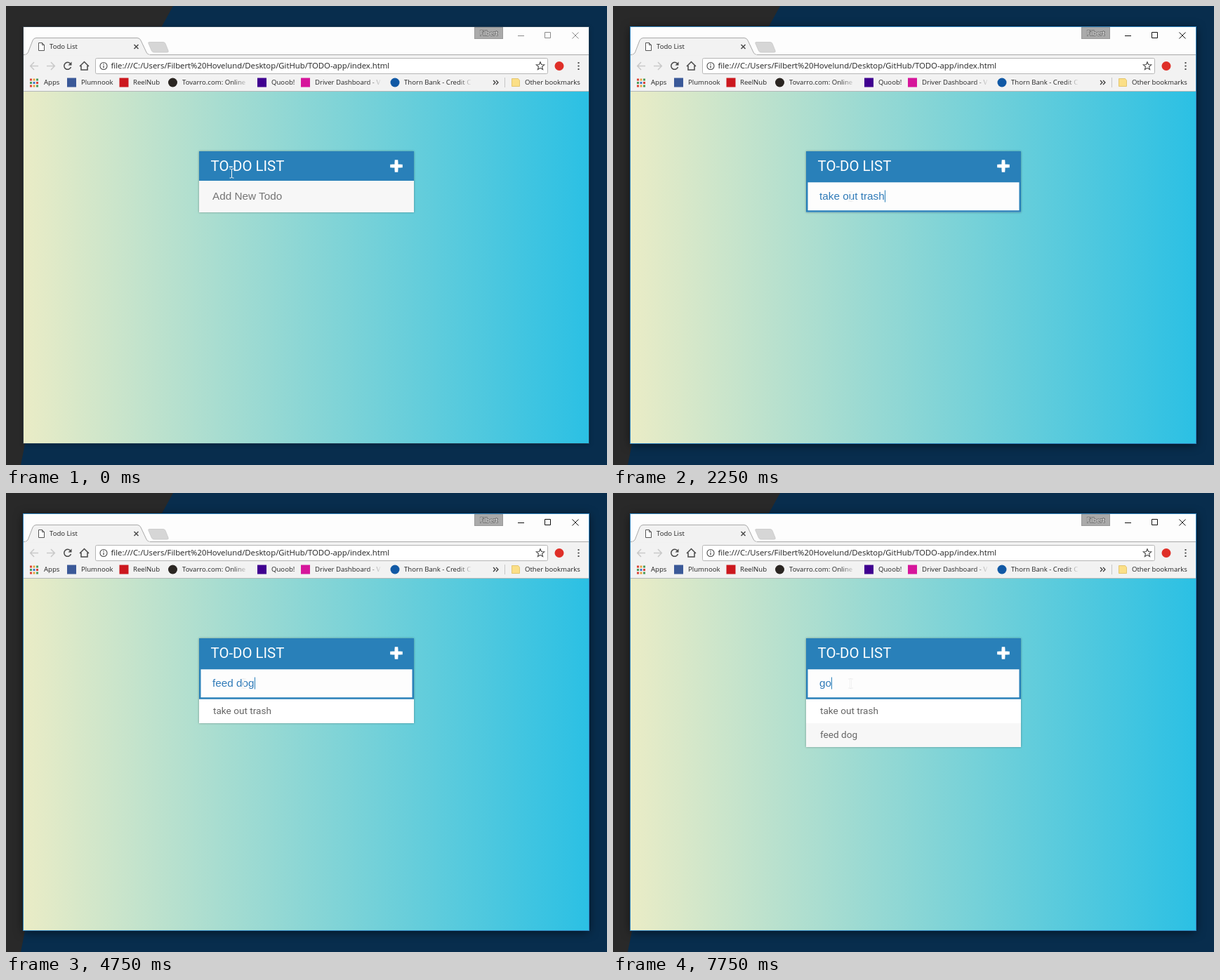
Write an HTML page that moves like this. It is 856 by 654 pixels and loops after 8000 ms.

```html
<!DOCTYPE html>
<html lang="en">
<head>
<meta charset="utf-8">
<title>Todo List</title>
<style>
  html, body { margin: 0; height: 100%; overflow: hidden; background: #082d4d; }
  svg { display: block; }
  text { white-space: pre; }
  .ui { font: 9.6px "Open Sans", "Noto Sans", sans-serif; fill: #222; }
  .input { font: 15.3px "Liberation Sans", Arial, sans-serif; }
  .item { font: 13.6px Roboto, sans-serif; fill: #666; }
  .line { fill: none; stroke: #4a4a4a; stroke-width: 1.5; }
  #win { filter: drop-shadow(0 1px 3px rgba(0,0,0,.35)); }
  .active #win { filter: drop-shadow(0 2px 7px rgba(0,0,0,.6)); }
  #edge { fill: none; stroke: #4d6478; opacity: .4; }
  .active #edge { stroke: #2f82bd; opacity: 1; }
  #controls { fill: none; stroke: #8a8a8a; }
  .active #controls { stroke: #111; }
  #card { filter: drop-shadow(0 0 1.5px rgba(0,0,0,.35)); }
</style>
</head>
<body>
<svg id="stage" width="856" height="654" viewBox="0 0 856 654">
  <defs>
    <linearGradient id="page"><stop stop-color="#eaecc6"/><stop offset="1" stop-color="#2bc0e4"/></linearGradient>
    <linearGradient id="fade"><stop stop-color="#f2f2f2" stop-opacity="0"/><stop offset="1" stop-color="#f2f2f2"/></linearGradient>
  </defs>

  <rect width="856" height="654" fill="#082d4d"/>
  <path d="M0 0H238L222 29V200L27 624L21 654H0Z" fill="#292929"/>

  <rect id="win" x="25" y="30" width="805" height="593" fill="#fdfdfd"/>
  <rect x="25" y="69" width="805" height="53" fill="#f2f2f2"/>
  <rect x="25" y="122" width="805" height="501" fill="url(#page)"/>
  <path d="M25 121.5H830" stroke="#b4b8b8"/>
  <path d="M25 69.5H27Q30 69 31.500 66L38 49Q39.500 45.500 43 45.500H187Q190.500 45.500 192 49L200 66Q201.500 69.500 205 69.500H830" fill="#f2f2f2" stroke="#a9a9a9"/>
  <path d="M27 70H205" stroke="#f2f2f2"/>
  <path d="M204 51.500H224Q226 51.500 227 53.500L231 63.500Q232 66 229.500 66H211Q208.500 66 207.500 64L203 53.500Q202 51.500 204 51.500Z" fill="#d6d6d6" stroke="#c3c3c3" stroke-width=".7"/>
  <rect id="edge" x="24.5" y="29.5" width="806" height="594"/>

  <!-- tab and window buttons -->
  <path d="M46.500 52.500H51.500L54.500 55.500V63.500H46.500ZM51.500 52.500V55.500H54.500" fill="#fff" stroke="#555"/>
  <text class="ui" x="62" y="61.300">Todo List</text>
  <path class="line" d="M182.500 55L188.500 61M188.500 55L182.500 61"/>
  <rect x="667.5" y="30.500" width="40" height="16" fill="#aaa" stroke="#999"/>
  <text class="ui" x="687.5" y="41.600" text-anchor="middle" style="font-size:8.6px;fill:#fff;stroke:#666;stroke-width:1.4px;paint-order:stroke">Filbert</text>
  <path id="controls" d="M729 42.500H738M767.500 37.500H775.500V45.500H767.500ZM806.500 37.500L815.500 46.500M815.500 37.500L806.500 46.500"/>

  <!-- toolbar -->
  <g class="line">
    <path d="M46 85.500H35M40 80L34.700 85.500L40 91M58 85.500H69M64 80L69.300 85.500L64 91" stroke="#c9c9c9"/>
    <path d="M91.500 82A5 5 0 1 0 92.500 87"/>
    <path d="M105 86L111.500 79.500L118 86M107 85V91H116V85"/>
  </g>
  <path d="M93.500 79.500V84.500H88.500Z" fill="#4a4a4a"/>
  <rect x="127.5" y="74.500" width="644" height="22" rx="2" fill="#fff" stroke="#b5b5b5"/>
  <circle class="line" cx="139" cy="85.500" r="5" style="stroke-width:1.1"/>
  <path d="M139 82V83.500M139 84.700V88.500" stroke="#4a4a4a" stroke-width="1.2"/>
  <text class="ui" x="149.500" y="89.300" style="font-size:11.35px">file:///C:/Users/Filbert%20Hovelund/Desktop/GitHub/TODO-app/index.html</text>
  <path class="line" d="M761 79.700L762.600 83.500L766.700 83.800L763.500 86.500L764.600 90.500L761 88.300L757.400 90.500L758.500 86.500L755.300 83.800L759.400 83.500Z" style="stroke-width:1.100"/>
  <circle cx="788" cy="85.500" r="6.500" fill="#df2f28"/>
  <path d="M815.500 80V82M815.500 84.500V86.500M815.500 89V91" stroke="#4a4a4a" stroke-width="2"/>

  <!-- bookmarks -->
  <g id="bookmarks" class="ui"></g>
  <path d="M694 106L697 109L694 112M698 106L701 109L698 112" fill="none" stroke="#333" stroke-width="1.2"/>
  <path d="M710.500 102V116" stroke="#c6c6c6"/>
  <path d="M720.500 103.500H729.500L731.500 106V114.500H720.500Z" fill="#fbdf87" stroke="#dfbd5c" stroke-width=".8"/>
  <text class="ui" x="739" y="112.300">Other bookmarks</text>

  <!-- to-do card -->
  <g id="card">
    <rect id="back" x="275" y="207" width="306" height="87" fill="#f7f7f7"/>
    <rect id="row1" x="275" y="294" width="306" height="34" fill="#fff"/>
    <rect id="row2" x="275" y="328" width="306" height="34" fill="#f7f7f7"/>
  </g>
  <rect x="275" y="207" width="306" height="42" fill="#2980b9"/>
  <text x="291.500" y="235.300" fill="#fff" style="font:20.4px Roboto,sans-serif">TO-DO LIST</text>
  <path d="M556 221.500V234.500M549.500 228H562.500" stroke="#fff" stroke-width="4.600" stroke-linecap="square"/>
  <path d="M556 221.500V234.500M549.500 228H562.500" stroke="#fff" stroke-width="4.600"/>
  <rect id="focus" x="276.250" y="250" width="303.500" height="42.500" fill="#fdfdfd" stroke="#2980b9" stroke-width="2.500"/>
  <text id="field" class="input" x="294" y="276"></text>
  <rect id="caret" y="262.500" width="1" height="17" fill="#2980b9"/>
  <text id="item1" class="item" x="295" y="315">take out trash</text>
  <text id="item2" class="item" x="295" y="349">feed dog</text>
  <g id="pointer" fill="none">
    <path d="M-3 -6.500H-1L0 -5.500L1 -6.500H3M0 -5.500V5.500M-3 6.500H-1L0 5.500L1 6.500H3" stroke="#000" stroke-opacity=".08" stroke-width="2.200"/>
    <path d="M-3 -6.500H-1L0 -5.500L1 -6.500H3M0 -5.500V5.500M-3 6.500H-1L0 5.500L1 6.500H3" stroke="#fff"/>
  </g>
</svg>
<script>
const $ = id => document.getElementById(id);
const LOOP = 8000;
const TASK1 = 'take out trash', TASK2 = 'feed dog', TASK3 = 'go';

// [start time, typed text, caret visible]
const steps = [
  [0, '', 0], [500, '', 1],
  ...[4, 6, 8, 11, 12, 14].map((n, i) => [1000 + i * 250, TASK1.slice(0, n), 1]),
  [2500, '', 1], [3000, '', 0],
  ...[1, 2, 4, 6, 7, 8].map((n, i) => [3500 + i * 250, TASK2.slice(0, n), 1]),
  [5250, '', 1], [5750, '', 0], [6250, '', 1], [6750, '', 0], [7250, '', 1],
  [7750, TASK3, 1]
];

// [icon x centre, colour, round, label x, label, cut-off x, cover width]
const bookmarks = [
  [93.5, '#3b5998', 0, 107, 'Plumnook'],
  [168, '#cc181e', 0, 181, 'ReelNub'],
  [237.5, '#2b2622', 1, 251, 'Tovarro.com: Online', 345, 11],
  [364.5, '#400090', 0, 378, 'Quoob!'],
  [426.5, '#d6169b', 0, 440, 'Driver Dashboard - V', 535, 10],
  [554, '#1159a5', 1, 567, 'Thorn Bank - Credit C', 664, 26]
];

function drawBookmarks() {
  const colors = ['#db4437', '#e8a33d', '#4a9b5b', '#4178c8'];
  let out = '<text x="54" y="112.3">Apps</text>';
  for (let i = 0; i < 9; i++) {
    const col = i % 3, row = (i - col) / 3;
    out += `<rect x="${34 + col * 4.5}" y="${103.5 + row * 4.5}" width="3" height="3" fill="${colors[(col + row * 2) % 4]}"/>`;
  }
  for (const [x, color, round, tx, label, cut, cover] of bookmarks) {
    out += `<rect x="${x - 6.5}" y="102.5" width="13" height="13" rx="${round ? 6.5 : 0}" fill="${color}"/>`;
    out += `<text x="${tx}" y="112.3">${label}</text>`;
    if (cut) out += `<rect x="${cut - 20}" y="100" width="20" height="18" fill="url(#fade)"/>
      <rect x="${cut}" y="100" width="${cover}" height="18" fill="#f2f2f2"/>`;
  }
  $('bookmarks').innerHTML = out;
}

const show = (id, on) => $(id).style.display = on ? '' : 'none';

function render(t) {
  const [, typed, caret] = steps.findLast(s => s[0] <= t);
  const active = t >= 500, field = $('field');
  $('stage').setAttribute('class', active ? 'active' : '');
  show('focus', active);
  field.textContent = typed || 'Add New Todo';
  field.setAttribute('fill', typed ? '#2f7ab8' : '#757575');
  show('caret', caret);
  $('caret').setAttribute('x', Math.round(294 + (typed ? field.getComputedTextLength() : 0)));
  for (const id of ['row1', 'item1']) show(id, t >= 2500);
  for (const id of ['row2', 'item2']) show(id, t >= 5250);
  $('pointer').setAttribute('transform', t < 250 ? 'translate(321.5 238.5)' : 'translate(338.5 271.5)');
}

drawBookmarks();
const start = performance.now();
function tick() {
  render((performance.now() - start) % LOOP);
  requestAnimationFrame(tick);
}
tick();
</script>
</body>
</html>
```
